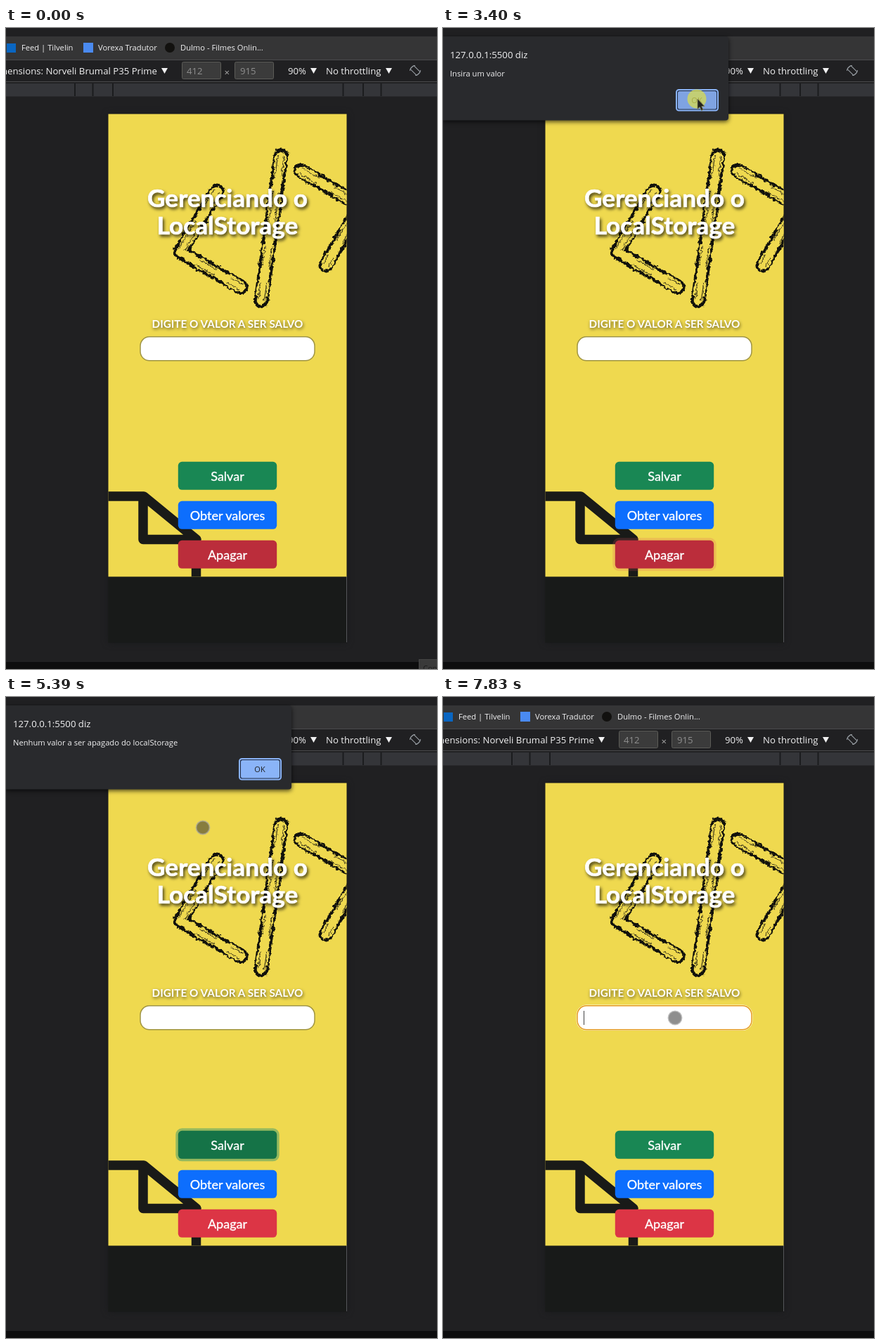
An HTML page that plays this animation: 613 by 913 pixels, repeating every 8 s.

```html
<!DOCTYPE html>
<html lang="pt-BR">
<head>
<meta charset="utf-8">
<title>Gerenciando o LocalStorage</title>
<style>
  html, body { margin: 0; width: 100%; height: 100%; overflow: hidden; background: #202022; }
  svg { display: block; width: 613px; height: 913px; }
  .ui { font: 13.2px "Open Sans", "Noto Sans", sans-serif; fill: #f1f1f2; }
  .small { font-size: 11.2px; }
  .page { font-family: Lato, sans-serif; fill: #fff; text-anchor: middle; }
  .title { font-size: 35.2px; font-weight: 700; stroke: #fff; stroke-width: .7; filter: drop-shadow(2px 3px 2px rgba(0, 0, 0, .7)); }
  .label { font-size: 15.3px; font-weight: 700; filter: drop-shadow(1px 2px 2px rgba(0, 0, 0, .6)); }
  .button { font-size: 18px; stroke: #fff; stroke-width: .35; }
  .ring { stroke-width: 7; paint-order: stroke; }
  .sketch { fill: none; stroke-linecap: round; stroke-linejoin: round; }
  .ink { stroke: #12120c; }
  .paper { stroke: #efd94f; }
</style>
</head>
<body>
<svg viewBox="0 0 613 913">
  <defs>
    <clipPath id="screen"><rect x="145.5" y="122.6" width="339" height="659"/></clipPath>
    <filter id="rough" x="-10%" y="-10%" width="120%" height="120%" color-interpolation-filters="sRGB">
      <feTurbulence type="fractalNoise" baseFrequency=".2" numOctaves="3" seed="4"/>
      <feDisplacementMap in="SourceGraphic" scale="6" xChannelSelector="R" yChannelSelector="G"/>
    </filter>
    <path id="code" d="M300 232L248 319L334 369M391 182L363 388M419 203L504 253L455 338"/>
    <path id="caretDown" d="M0 0h9l-4.5 8z" fill="#f1f1f2"/>
  </defs>

  <!-- Browser chrome -->
  <rect width="613" height="913" fill="#202022"/>
  <rect y="12" width="613" height="33" fill="#353536"/>
  <path d="M0 45.5H613M0 76.5H613" stroke="#4a4b4d"/>
  <rect x="1" y="22" width="13" height="13" fill="#0a66c2"/>
  <rect x="110" y="21" width="14" height="14" fill="#4a8af0"/>
  <circle cx="233" cy="28" r="7" fill="#12110f"/>
  <g class="ui small">
    <text x="22" y="32">Feed | Tilvelin</text>
    <text x="131" y="32">Vorexa Tradutor</text>
    <text x="248" y="32">Dulmo - Filmes Onlin...</text>
  </g>
  <g class="ui">
    <text x="215" y="66" text-anchor="end">Dimensions: Norveli Brumal P35 Prime</text>
    <text x="401" y="66">90%</text>
    <text x="455" y="66">No throttling</text>
  </g>
  <use href="#caretDown" x="221" y="57"/>
  <use href="#caretDown" x="433" y="57"/>
  <use href="#caretDown" x="540" y="57"/>
  <g fill="#3b3b3b" stroke="#5c5c58">
    <rect x="250.5" y="48.5" width="55" height="24" rx="2"/>
    <rect x="325.5" y="48.5" width="55" height="24" rx="2"/>
  </g>
  <g class="ui" style="fill:#8f8f8f">
    <text x="257" y="66">412</text>
    <text x="333" y="66">915</text>
    <text x="310.5" y="68" style="fill:#aaa">×</text>
  </g>
  <g fill="none" stroke="#9aa0a6">
    <rect x="578.5" y="54" width="7" height="13" rx="1" transform="rotate(-45 582 60.5)"/>
    <path d="M574.5 61a7.5 7.5 0 0 1 7.5-7.5M589.5 60a7.5 7.5 0 0 1-7.5 7.500"/>
  </g>
  <rect y="79" width="613" height="18.5" fill="#343539"/>
  <path d="M98 79v18M123.5 79v18M152 79v18M479.5 79v18M508 79v18M533.5 79v18" stroke="#1b1c1e" stroke-width="2"/>
  <rect y="903" width="613" height="10" fill="#0d0d0e"/>
  <g id="tooltip">
    <rect x="587.5" y="899.5" width="30" height="20" fill="#3a3a3a" stroke="#464646"/>
    <text class="ui" x="593" y="916" style="font-size:11px;fill:#1c1c1c">Con</text>
  </g>

  <!-- Phone page -->
  <rect x="145.5" y="122.6" width="339" height="753" fill="#181a19" style="filter:drop-shadow(0 0 5px #18191b)"/>
  <path d="M484.5 781V875" stroke="#55565a"/>
  <g clip-path="url(#screen)">
    <rect x="145" y="122" width="340" height="660" fill="#efd94f"/>
    <g class="sketch" filter="url(#rough)">
      <use href="#code" class="ink" stroke-width="21"/>
      <use href="#code" class="paper" stroke-width="16" stroke-dasharray="23 34 31 41 13 37" stroke-linecap="butt"/>
      <use href="#code" class="paper" stroke-width="12.5"/>
      <use href="#code" class="ink" stroke-width="10" stroke-dasharray="29 23 47 31" stroke-linecap="butt" opacity=".75"/>
      <use href="#code" class="paper" stroke-width="7.5"/>
    </g>
    <path class="sketch" d="M140 667H196L271 728.5H195V667M270.5 728V790" stroke="#191a18" stroke-width="13.5"/>
  </g>
  <g class="page">
    <g class="title">
      <text x="315" y="255">Gerenciando o</text>
      <text x="315" y="293.5">LocalStorage</text>
    </g>
    <text class="label" x="315" y="427">DIGITE O VALOR A SER SALVO</text>
    <rect id="inputGlow" x="189.7" y="438.5" width="250.6" height="36.5" rx="14.5" fill="#fff"/>
    <rect id="input" x="191" y="439.8" width="248" height="34" rx="13" fill="#fff" stroke-width="1.5"/>
    <path id="caret" d="M200.5 447V467" stroke="#444"/>
    <rect id="saveButton" class="ring" x="244.8" y="617.8" width="140.4" height="40" rx="5.5" stroke="#3c996e"/>
    <rect x="244.8" y="673.8" width="140.4" height="40" rx="5.5" fill="#0d6efd"/>
    <rect id="eraseButton" class="ring" x="244.8" y="729.8" width="140.4" height="40" rx="5.5" stroke="#e15361"/>
    <g class="button">
      <text x="315" y="645">Salvar</text>
      <text x="315" y="701">Obter valores</text>
      <text x="315" y="757">Apagar</text>
    </g>
  </g>

  <!-- Alert -->
  <g id="dialog">
    <path d="M0 12H402q4 0 4 4V127.5q0 4-4 4H0z" fill="#292a2d" style="filter:drop-shadow(0 2px 3px rgba(0,0,0,.7))"/>
    <g class="ui">
      <text x="10" y="43">127.0.0.1:5500 diz</text>
      <text id="message" class="small" x="10" y="69"></text>
    </g>
    <rect x="332" y="88" width="59" height="29.5" rx="3.5" fill="#202c45" stroke="#8ab4f8" stroke-width="2"/>
    <rect id="okButton" x="334" y="90" width="55" height="25.5" rx="2.5"/>
    <text class="ui" x="361" y="106.5" text-anchor="middle" style="font-size:11px;fill:#202124">OK</text>
  </g>

  <g id="pointer">
    <circle id="touch" r="9.5" fill="#323232" fill-opacity=".55" stroke="#aaa" stroke-opacity=".6" stroke-width="2"/>
    <g id="arrow">
      <circle r="13.5" fill="#d8dc50" fill-opacity=".75"/>
      <path d="M1 0V14.5L4.2 11.5L6.5 16.5L9 15.4L6.8 10.6H11z" fill="#22221c" stroke="#8b8a58" stroke-width=".8"/>
    </g>
  </g>
</svg>
<script>
const LOOP = 8000;
const el = Object.fromEntries([...document.querySelectorAll('[id]')].map(node => [node.id, node]));

// Pointer stops: time, x, y
const stops = [
  [410, 556, 898], [1150, 351, 658], [1290, 339, 641], [2090, 339, 641],
  [2850, 364, 155], [3250, 361, 101], [3450, 361, 101], [3680, 299, 566],
  [3960, 287, 670], [4300, 299, 747], [4750, 299, 747], [5390, 280, 186],
  [5670, 308, 141], [5810, 308, 141], [6200, 361, 103], [6540, 361, 103],
  [6700, 339, 286], [7370, 331, 450], [7500, 330, 457]
];

const within = (t, from, to) => t >= from && t < to;
const show = (node, visible) => node.setAttribute('visibility', visible ? 'inherit' : 'hidden');
const ease = u => u * u * (3 - 2 * u);

function pointerAt(t) {
  const next = stops.findIndex(stop => stop[0] > t);
  if (next < 0) return stops.at(-1).slice(1);
  if (next === 0) return stops[0].slice(1);
  const [t0, x0, y0] = stops[next - 1];
  const [t1, x1, y1] = stops[next];
  const u = ease((t - t0) / (t1 - t0));
  return [x0 + (x1 - x0) * u, y0 + (y1 - y0) * u];
}

function paintButton(node, fill, ringOpacity) {
  node.setAttribute('fill', fill);
  node.setAttribute('stroke-opacity', ringOpacity);
}

function render(t) {
  const emptyAlert = within(t, 1420, 3500);
  const eraseAlert = within(t, 4630, 6540);
  const saveActive = within(t, 3500, 6620);
  const eraseFocused = within(t, 6620, 7510);
  const inputFocused = t >= 7510;

  show(el.tooltip, t < 70);
  show(el.dialog, emptyAlert || eraseAlert);
  el.message.textContent = emptyAlert ? 'Insira um valor' : 'Nenhum valor a ser apagado do localStorage';

  paintButton(el.saveButton, saveActive ? '#157347' : '#198754', saveActive ? .5 : 0);
  paintButton(el.eraseButton, t < 3500 || eraseFocused ? '#bb2d3b' : '#dc3545',
    eraseFocused ? .55 : emptyAlert ? .2 : 0);

  show(el.inputGlow, inputFocused);
  show(el.caret, inputFocused);
  el.input.setAttribute('stroke', inputFocused ? '#e59a1c' : '#a09544');

  const [x, y] = pointerAt(t);
  const onPage = x < 485 && y > 131;
  const overOk = Math.abs(x - 361) < 30 && Math.abs(y - 103) < 15;
  el.okButton.setAttribute('fill', overOk ? '#7fa3e2' : '#8ab4f8');
  el.pointer.setAttribute('transform', `translate(${x} ${y})`);
  show(el.pointer, t >= 410);
  show(el.touch, onPage);
  show(el.arrow, !onPage);
}

function tick() {
  render(performance.now() % LOOP);
  requestAnimationFrame(tick);
}
tick();
</script>
</body>
</html>
```
